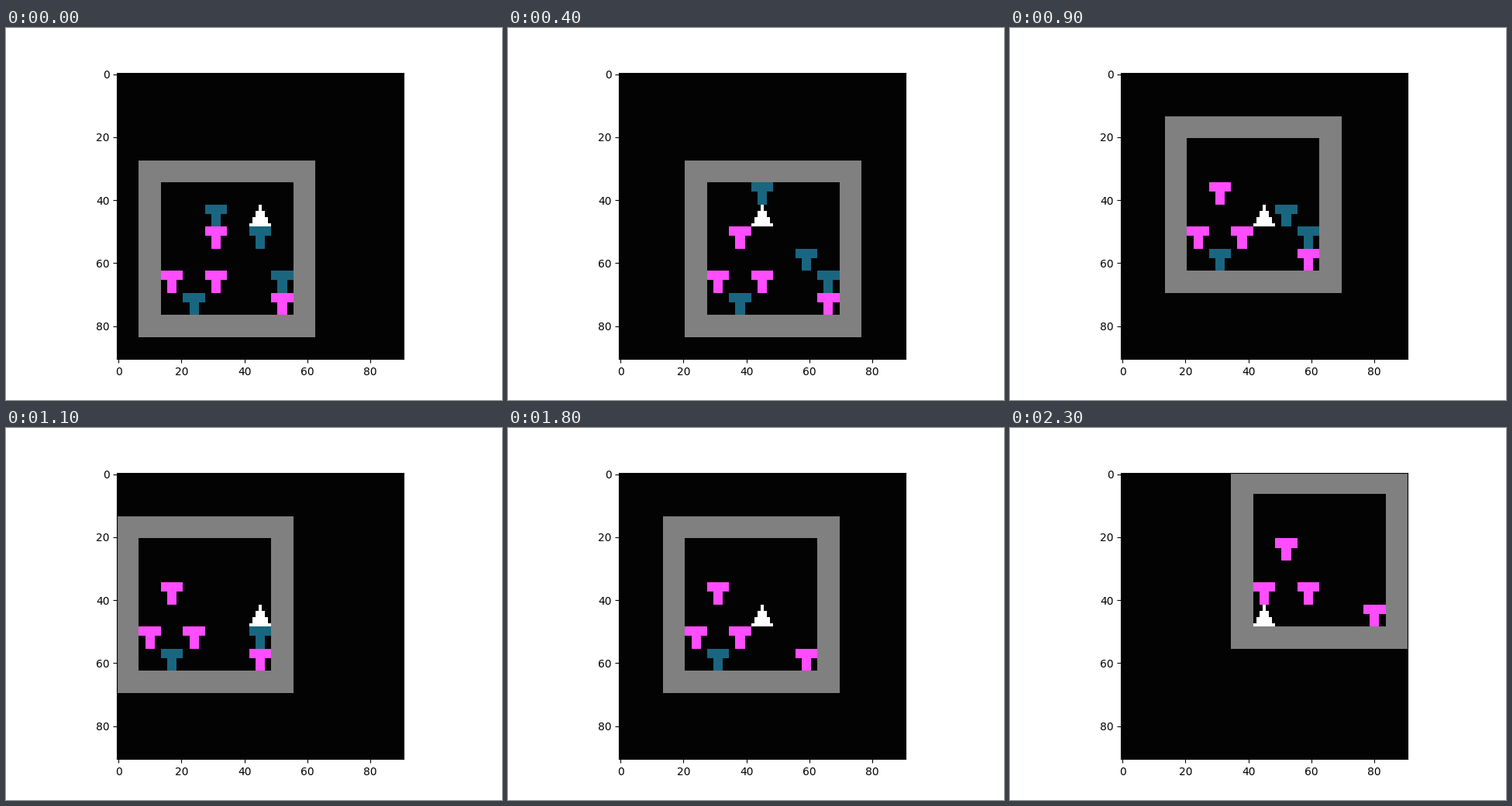
These frames come from a looping animation (640x480 px, 2400 ms). A matplotlib script:

```python
import numpy as np
import matplotlib.pyplot as plt
from matplotlib.animation import FuncAnimation

CELL, VIEW, ROOM = 7, 13, 6
MID = VIEW // 2
BLACK, GREY, WHITE = (3, 3, 3), (128, 128, 128), (255, 255, 255)
TEAL, PINK = (26, 102, 128), (255, 77, 255)

STEPS = {"U": (0, -1), "D": (0, 1), "L": (-1, 0), "R": (1, 0)}
MOVES = "DLLUUDDDRRRDLDRLLULLDDL"
START = (4, 1)
BLOCKS = {
    (2, 1): TEAL, (4, 2): TEAL, (5, 4): TEAL, (1, 5): TEAL,
    (2, 2): PINK, (0, 4): PINK, (2, 4): PINK, (5, 5): PINK,
}

row, col = np.mgrid[:CELL, :CELL]
TEE = (row < 3) | (abs(col - 3) < 2)
SHIP = abs(col - 3) <= row // 2


def inside(pos):
    return all(0 <= c < ROOM for c in pos)


def step(agent, blocks, move):
    """Move the agent; a block is pushed along, or lost against the wall."""
    dx, dy = STEPS[move]
    to = (agent[0] + dx, agent[1] + dy)
    beyond = (to[0] + dx, to[1] + dy)
    if not inside(to) or (to in blocks and beyond in blocks):
        return agent, blocks
    blocks = dict(blocks)
    color = blocks.pop(to, None)
    if color and inside(beyond):
        blocks[beyond] = color
    return to, blocks


def render(agent, blocks):
    """Paint the room as seen with the agent fixed at the centre."""
    img = np.full((VIEW * CELL, VIEW * CELL, 3), BLACK, np.uint8)
    ox, oy = MID - agent[0], MID - agent[1]

    def square(x, y, size, color):
        img[y * CELL:(y + size) * CELL, x * CELL:(x + size) * CELL] = color

    def sprite(x, y, mask, color):
        img[y * CELL:(y + 1) * CELL, x * CELL:(x + 1) * CELL][mask] = color

    square(ox - 1, oy - 1, ROOM + 2, GREY)
    square(ox, oy, ROOM, BLACK)
    for (x, y), color in blocks.items():
        sprite(ox + x, oy + y, TEE, color)
    sprite(MID, MID, SHIP, WHITE)
    return img


states = [(START, BLOCKS)]
for move in MOVES:
    states.append(step(*states[-1], move))

fig, ax = plt.subplots(figsize=(6.4, 4.8), dpi=100)
picture = ax.imshow(render(*states[0]))


def update(i):
    picture.set_data(render(*states[i]))
    return [picture]


anim = FuncAnimation(fig, update, frames=len(states), interval=100,
                     repeat=True, repeat_delay=0)
plt.show()
```
